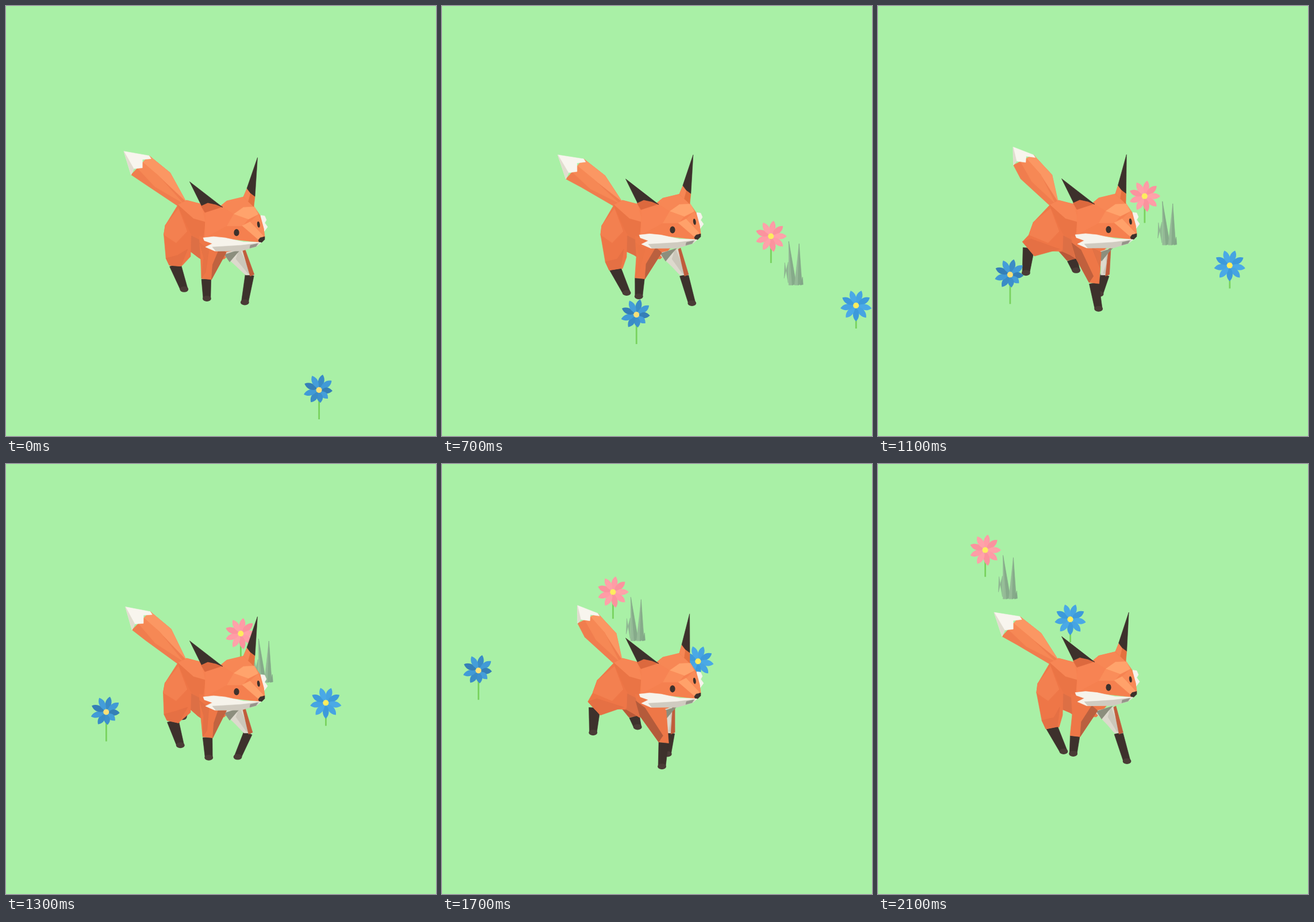
Animation of 748 by 748 pixels, one loop 2.2 s. Source, as an HTML page with a canvas:

```html
<!DOCTYPE html>
<html lang="en">
<head>
<meta charset="utf-8">
<title>Walking fox</title>
<style>
html, body { margin: 0; width: 100%; height: 100%; overflow: hidden; background: #a9f0a6; }
canvas { display: block; width: 748px; height: 748px; }
</style>
</head>
<body>
<canvas id="stage" width="748" height="748"></canvas>
<script>
const ctx = document.getElementById('stage').getContext('2d');
const LOOP = 2200, STEP = 100, PERIOD = 6.8, HALF = PERIOD / 2;
const DARK = '#3d312c', FOOT = '#4a3b36';
const BLUE_SHADE = ['#3a8cc6', '#419ad6', '#357fb7', '#449dd9', '#3c90cc'];
const BLUE = ['#46a4e2', '#3d9adb', '#4aa9e6'];
const PINK = ['#ff9ca6', '#fb939e', '#ffa2a9'];

const mix = (a, b, k) => a + (b - a) * k;
const clamp = v => Math.max(0, Math.min(1, v));
const wave = (phase, peak, n = 1) => Math.cos(2 * Math.PI * n * (phase - peak) / PERIOD);

// Stride from -1 (back) to 1 (front): quick swing forward, slow push back
function stride(phase) {
  const swing = 1.7, u = (phase - 2.4 + 2 * PERIOD) % PERIOD;
  if (u < swing) return -Math.cos(Math.PI * u / swing);
  return Math.cos(Math.PI * ((u - swing) / (PERIOD - swing)) ** 0.7);
}

// Ground distance covered, with one small jump early in the loop
function travel(ms) {
  const f = ms / STEP;
  return f + (f < 5 ? -0.04 * f : 0.35 + 0.09 * clamp((9 - f) / 2));
}

function poly(color, pts) {
  ctx.beginPath();
  for (let i = 0; i < pts.length; i += 2) ctx.lineTo(pts[i], pts[i + 1]);
  ctx.closePath();
  ctx.fillStyle = ctx.strokeStyle = color;
  ctx.lineWidth = 0.6;
  ctx.lineJoin = 'round';
  ctx.fill();
  ctx.stroke();
}

function oval(color, x, y, rx, ry, turn = 0) {
  ctx.beginPath();
  ctx.ellipse(x, y, rx, ry, turn, 0, Math.PI * 2);
  ctx.fillStyle = color;
  ctx.fill();
}

// squash shortens the petals that lean towards the lower right
function flower(x, y, stem, colors, core, tilt, squash = 0) {
  ctx.fillStyle = '#79d35f';
  ctx.fillRect(x - 1.3, y, 2.8, stem);
  for (let i = 0; i < 9; i++) {
    const turn = tilt + i * Math.PI * 2 / 9;
    const r = 27.5 - squash * Math.max(0, Math.cos(turn - 0.9));
    ctx.save();
    ctx.translate(x, y);
    ctx.rotate(turn);
    ctx.beginPath();
    ctx.moveTo(3, 0);
    ctx.bezierCurveTo(10, -6.5, r - 7, -7.5, r, 0);
    ctx.bezierCurveTo(r - 7, 7.5, 10, 6.5, 3, 0);
    ctx.fillStyle = colors[i % colors.length];
    ctx.fill();
    ctx.restore();
  }
  oval(core, x, y, 5, 5);
}

function grass(x, y) {
  const blade = (color, ...p) => poly(color, p.map((v, i) => v + (i % 2 ? y : x)));
  blade('#8fb592', -8, -40, -15, -12, -14, -39, -8, -4);
  for (const [tip, height, foot] of [[-7, -76, -1], [11, -72, 9]]) {
    blade('#95ba97', tip, height, foot - 6, 0, foot + 1, 0);
    blade('#86aa8a', tip, height, foot, 0, foot + 7, -2);
  }
  blade('#82a687', 17, -14, 13, 0, 18, -1);
}

function shin(kx, ky, fx, fy, top, bottom) {
  const len = Math.hypot(fx - kx, fy - ky) || 1;
  const nx = (fy - ky) / len, ny = (kx - fx) / len;
  poly(DARK, [kx - nx * top, ky - ny * top, kx + nx * top, ky + ny * top,
    fx + nx * bottom, fy + ny * bottom, fx - nx * bottom, fy - ny * bottom]);
  oval(FOOT, fx, fy, 7.4, 5);
}

function drawTail(phase) {
  const side = wave(phase, 0.7), s = (1 - side) / 2;
  const tx = 219 - 17.5 * side, ty = 246 + 6 * side + 7 * wave(phase, 0.7, 2);
  const lx = tx + mix(14, 0, s), ly = ty + mix(42, 31, s);
  const rx = tx + mix(45, 35, s), ry = ty + mix(7, 14, s);
  const qx = tx + mix(82, 67, s), qy = ty + mix(36, 49, s);
  const bx = mix(lx, 299, 0.32) - 8 * s, by = mix(ly, 346, 0.32) + 2 * s;
  // point along the white edge, pushed away from the tip
  const edge = (k, push) => [mix(lx, rx, k) + push * 0.75, mix(ly, ry, k) + push * 0.65];
  const zigzag = [0.24, 0.48, 0.72, 0.96].flatMap((k, i) => edge(k, i % 2 ? 6 : -4));
  const ridge = [mix(lx, qx, 0.7), mix(ly, qy, 0.7) + 4];
  poly('#f07d4e', [lx, ly, rx, ry, qx, qy, 313, 340, 302, 350, bx, by]);
  poly('#fb9763', [...edge(0.6, 0), rx, ry, qx, qy, 313, 340, ...ridge]);
  poly('#f68855', [...edge(0.35, 0), ...edge(0.65, 0), ...ridge, 308, 343,
    mix(lx, 300, 0.5), mix(ly, 345, 0.5) - 5]);
  poly('#f8f5ee', [tx, ty, lx, ly, ...zigzag, rx, ry]);
  poly('#e1dccf', [tx, ty, lx, ly, ...edge(0.24, -4)]);
}

function drawBody(phase, dy) {
  const low = dy * 0.8, sway = wave(phase, 0.7);
  const hx = 274 + 4 * sway, hy = 379 + 3 * sway;
  const ox = 269 + 7 * sway, oy = 398;

  const back = wave(phase, 4.4);
  const fx = 318 + 20 * back, fy = 430 + 11 * back;
  shin(fx, fy, 318 + 27 * back, 446 + 14 * back, 9, 6.5);
  poly('#b95838', [300, 410, 334, 410, fx + 9, fy - 2, fx - 9, fy + 2]);

  const near = wave(phase, 1);
  const kx = 282 + 20 * near, ky = 441 + 18 * near;
  shin(kx, ky - 2, 290 + 33 * near, 482 + 18 * near, 10, 6.3);
  const slant = 5 - 7 * near;
  const cuff = [kx - 14 - 3 * near, ky - 13, kx - 10, ky - slant, kx + 10, ky + slant];
  poly('#ef7848', [299, 346, 314, 338, 345, 346, 385, 360, 400, 418, 380, 440,
    343, 442 + low, 334, 436 + low, 321, 427, 290, 426, ox, oy, hx, hy]);
  poly('#f78655', [299, 346, 314, 338, 345, 346, 347, 376, 326, 370]);
  poly('#ea7445', [299, 346, 326, 370, 347, 376, 341, 410, 320, 396]);
  poly('#dd6f45', [320, 398, 342, 410, 343, 442 + low, 334, 436 + low, 321, 427, 314, 421]);
  poly('#ee7647', [300, 352, hx, hy, ox, oy, ...cuff, kx + 13, ky - 1,
    321, Math.max(425, Math.min(437, ky - 16)), 322, 398]);
  poly('#f38050', [300, 352, hx, hy, ox, oy, 296, 412, 315, 392]);
  poly('#e57044', [...cuff, 316, 423, kx + 4, ky - 18]);
}

function drawFront(phase, dy) {
  const farStep = stride(phase + HALF), farLift = stride(phase + HALF + 0.6);
  const ax = 409 + 15 * farLift, ay = 468;
  shin(ax, ay, 408 + 27 * farStep, Math.min(517, 512 + 13 * farStep), 7.6, 6);
  const top = 404 + clamp((ax - 397) / 24) * 10;
  poly('#ddd9cd', [376, 430, top, 422, ax + 8, ay, ax - 7, ay, mix(ax, 384, 0.55), mix(ay, 440, 0.5)]);
  poly('#cbc7ba', [top - 8, 422, ax + 3, ay - 2, ax - 3, ay - 3, 400, 440]);
  poly('#c05d3b', [top - 3, 423, top + 1, 421, ax + 8, ay - 1, ax + 1, ay + 2]);
  poly('#8c8e7d', [380, 432 + dy * 0.4, 408, 423 + dy * 0.4, 400, 432 + dy * 0.4, 389, 445 + dy * 0.3]);

  const step = stride(phase), lift = stride(phase + 0.6);
  const kx = 364 + 23 * lift, ky = 479 + 6 * lift;
  shin(kx, ky, 361 + 27 * step, 515 + 14 * step, 8.3, 6.4);
  const k = clamp((kx - 343) / 42), inner = 382 + k * 8;
  const left = [kx - 8.5, ky - 1], right = [kx + 9, ky + 1];
  poly('#ee7747', [336, 400, 338 + k * 5, 438 + dy * 0.8, ...left, ...right, inner, 429, 376, 412]);
  ctx.globalAlpha = 1 - k;
  poly('#b9603f', [...right, kx + 11, ky - 25, 372, 420, inner, 429]);
  ctx.globalAlpha = k;
  poly('#b45b3b', [337, 412, 344, 438, ...left, kx - 1, ky - 12, 353, 424]);
  ctx.globalAlpha = 1;
}

function drawHead(phase, dy) {
  ctx.save();
  ctx.translate(1, dy);
  poly('#f6f3ec', [442, 363, 449, 364, 452, 371, 449, 376, 454, 383, 446, 394, 440, 390]);
  poly('#f68251', [340, 348, 372, 347, 383, 338, 412, 331, 430, 347, 441, 363, 447, 385,
    449, 401, 441, 410, 378, 403, 344, 402, 346, 372]);
  poly('#f78755', [372, 347, 383, 338, 412, 331, 430, 347, 412, 349, 395, 361]);
  poly('#ffa36c', [395, 361, 412, 349, 431, 348, 438, 361, 420, 370]);
  poly('#f78353', [346, 358, 373, 347, 395, 361, 383, 382, 345, 402]);
  poly('#fa8d5a', [395, 361, 420, 370, 410, 382, 383, 382]);
  poly('#f5804f', [383, 382, 410, 382, 440, 408, 378, 402, 346, 402]);
  poly('#ffa16a', [410, 381, 424, 374, 447, 399, 439, 406]);
  poly('#f98b58', [438, 361, 447, 386, 449, 400, 424, 374]);

  const flick = 3.5 * wave(phase, 0), e = flick * 0.3;
  poly('#e4713f', [417 + e, 317, 431 + e, 330, 430, 348, 412, 331]);
  poly('#f68755', [417 + e, 317, 423 + e, 324, 420, 339, 412, 331]);
  poly(DARK, [433 + flick, 262.5, 417 + e, 316, 423 + e, 324, 431 + e, 330]);
  poly('#dc693e', [338, 346, 352, 340, 376, 348, 345, 358]);
  poly(DARK, [318.5, 304.5, 339, 346, 350, 341, 364, 344, 376, 349]);

  poly('#f6f3eb', [342, 402, 360, 400, 380, 402, 412, 409, 443, 410, 436, 416,
    408, 424, 362, 425, 346, 418, 358, 412, 344, 407]);
  poly('#d0cbc0', [358, 418, 376, 417, 408, 415, 440, 411, 435, 417, 408, 425, 364, 425]);
  poly('#96938a', [424, 415, 437, 412, 434, 417, 423, 420]);
  oval(DARK, 400, 393, 4.6, 6.2);
  oval(DARK, 438.3, 379, 2.4, 5.5, -0.15);
  poly(DARK, [438, 406, 441, 402, 449, 400, 449, 405, 444, 410, 439, 409]);
  ctx.restore();
}

function draw(ms) {
  const d = travel(ms), phase = d % PERIOD;
  const x = 544.5 - 27.73 * d, y = 668 - 17.45 * d - 0.02 * d * d;
  const bob = 0.3 + 4.7 * wave(phase, 2.65, 2);
  ctx.fillStyle = '#a9f0a6';
  ctx.fillRect(0, 0, 748, 748);

  flower(x + 234, y - 136.5, 46.5, PINK, '#ffec5e', -1.4);
  grass(x + 272, y - 51.5);
  flower(x + 382, y - 16, 40, BLUE, '#ffec5e', -1.22);
  drawTail(phase);
  drawBody(phase, bob);
  drawFront(phase, bob);
  drawHead(phase, bob);
  flower(x, y, 51, BLUE_SHADE, '#f8df78', -1.33, 6);
}

const start = performance.now();
function tick() {
  const ms = (performance.now() - start) % LOOP;
  draw(Math.floor(ms / STEP) * STEP);
  requestAnimationFrame(tick);
}
tick();
</script>
</body>
</html>
```
